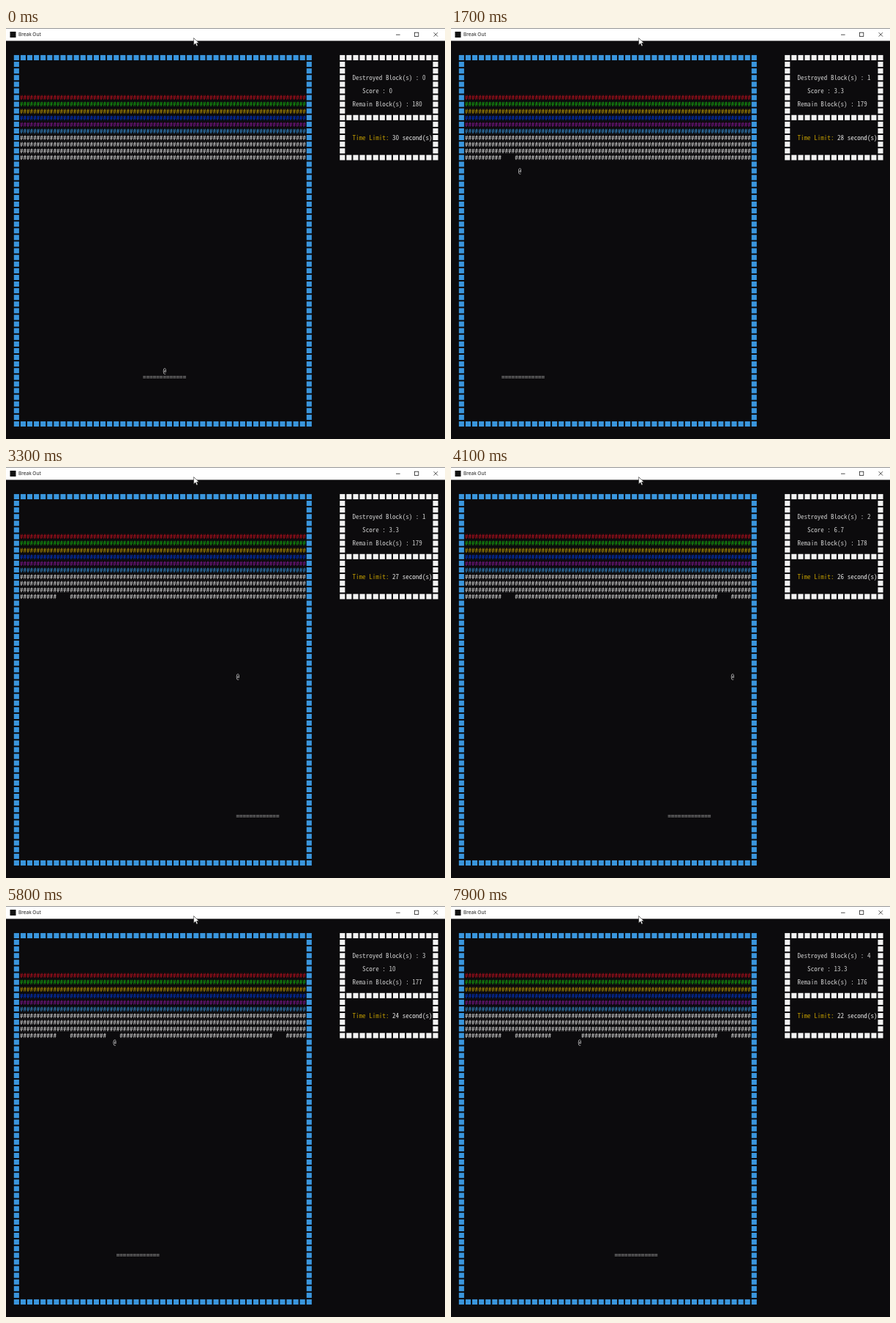
Recreate the animation shown at these times as an HTML page. Size 600x561 px, loop 8000 ms.

```html
<!DOCTYPE html>
<html lang="en">
<head>
<meta charset="utf-8">
<title>Break Out</title>
<style>
  html, body { margin: 0; width: 100%; height: 100%; overflow: hidden; background: #0c0b0d; }
  svg { display: block; width: 600px; height: 561px; }
  .cell { font: 9.09px "Noto Sans Mono CJK KR", "Noto Sans Mono CJK JP", "Liberation Mono", monospace; }
  .title { font: 6.6px "Open Sans", "Noto Sans", sans-serif; }
</style>
</head>
<body>
<svg id="stage" viewBox="0 0 600 561">
  <rect width="600" height="561" fill="#0c0b0d"/>
  <g id="walls"></g>
  <g id="console"></g>
  <rect width="600" height="17.5" fill="#fff"/>
  <rect width="600" height="0.7" fill="#666"/>
  <rect x="5.5" y="5" width="8" height="8" fill="#111"/>
  <text class="title" x="17" y="11.4" fill="#111">Break Out</text>
  <g fill="none" stroke="#222" stroke-width="0.8">
    <path d="M533 9.2h5.6M584.6 6.2l5.4 5.4M590 6.2l-5.4 5.4"/>
    <rect x="558.6" y="6.2" width="5.2" height="5.2"/>
  </g>
  <path d="M256.6 13.6v9.6l2.3-2.1 1.6 3.7 1.6-.7-1.6-3.5h3.1z" fill="#fff" stroke="#222" stroke-width="0.6"/>
</svg>
<script>
const NS = "http://www.w3.org/2000/svg";
const LOOP = 8000, FRAME = 100;
const CELL = 4.545, ROW = 9.09, LEFT = 18.95, TOP = 40.5;
const COLS = 86, PADDLE = 13, PADDLE_ROW = 48, LAST_BRICK_ROW = 15;
const LAUNCH = 574.2, STEP = 32.42, BOUNCE = 64;
const FIRST_TICK = 650;
const WHITE = "#e4e4e4", GREY = "#cccccc";

const walls = document.getElementById("walls");
const screen = document.getElementById("console");

function add(parent, tag, attrs) {
  const el = document.createElementNS(NS, tag);
  for (const key in attrs) el.setAttribute(key, attrs[key]);
  return parent.appendChild(el);
}

function label(fill) {
  return add(screen, "text", { class: "cell", fill });
}

// Puts one character in each console cell.
function print(el, col, row, str) {
  const xs = Array.from(str, (_, i) => (LEFT + (col + i) * CELL).toFixed(2));
  el.setAttribute("x", xs.join(" "));
  el.setAttribute("y", (TOP + row * ROW + 3.3).toFixed(2));
  const text = str.replace(/ /g, "\u00a0");
  if (el.textContent !== text) el.textContent = text;
}

function frame(col, width, height, fill, divider) {
  for (let r = 0; r < height; r++) {
    for (let c = 0; c < width; c++) {
      const edge = r % (height - 1) === 0 || c % (width - 1) === 0 || r === divider;
      if (edge) add(walls, "rect", {
        x: 10.8 + (col + c) * ROW, y: TOP - 3.55 + r * ROW, width: 7.1, height: 7.1, fill
      });
    }
  }
}

frame(0, 45, 56, "#3a96dd");
frame(49, 15, 16, "#f2f2f2", 9);

const brickColors = ["#c50f1f", "#16b010", "#c19c00", "#0037da", "#881798", "#3a96dd",
  WHITE, WHITE, WHITE, WHITE];
const bricks = brickColors.map((color, i) => {
  const el = label(color);
  print(el, 0, 6 + i, "#".repeat(COLS));
  return el;
});
const lastBricks = bricks[bricks.length - 1];

const destroyed = label(GREY), score = label(GREY), remain = label(GREY);
const limit = label("#c19c00"), seconds = label(WHITE);
const paddle = label(GREY), ball = label(WHITE);
print(limit, 100, 12, "Time Limit:");

// Ball columns per step: it pauses a step at a side wall and after the paddle.
const ballCols = [17];
for (let s = 1, x = 17, dir = -1; s < 240; s++) {
  if (s === 1 || s % BOUNCE !== 1) {
    const next = x + dir;
    if (next < 0 || next > 84) dir = -dir;
    else x = next;
  }
  ballCols.push(x);
}

const paddleKeys = [[0, 37], [120, 37], [540, 11], [1750, 11], [2450, 35], [2700, 35],
  [3200, 65], [3900, 65], [4300, 55], [5250, 55], [6400, -1], [6850, -1], [7650, 45], [LOOP, 45]];

function paddleCol(t) {
  const i = paddleKeys.findIndex(key => key[0] > t);
  const [t0, a] = paddleKeys[i - 1], [t1, b] = paddleKeys[i];
  const col = a + (b - a) * (t - t0) / (t1 - t0);
  return 2 * Math.round((col - 1) / 2) + 1;
}

function hitBlocks(step) {
  const hits = new Set();
  for (let s = BOUNCE / 2; s <= step; s += BOUNCE) hits.add(Math.floor(ballCols[s] / 5));
  return hits;
}

function draw(t) {
  const step = Math.floor((t - LAUNCH) / STEP);
  const left = paddleCol(t);
  const hits = hitBlocks(step);

  // A block's first cell stays covered while its left neighbour stands.
  const row = Array.from({ length: COLS }, (_, c) => {
    const block = Math.floor(c / 5);
    return hits.has(block) && (c % 5 || hits.has(block - 1)) ? " " : "#";
  });
  print(lastBricks, 0, LAST_BRICK_ROW, row.join(""));

  print(paddle, Math.max(left, 0), PADDLE_ROW, "=".repeat(PADDLE + Math.min(left, 0)));
  if (step < 0) print(ball, left + 6, PADDLE_ROW - 1, "@");
  else print(ball, ballCols[step], LAST_BRICK_ROW + Math.abs(32 - step % BOUNCE), "@");

  const n = hits.size;
  const time = 30 - Math.max(0, Math.floor((t - FIRST_TICK) / 1000) + 1);
  print(destroyed, 100, 3, `Destroyed Block(s) : ${n}`);
  print(score, 103, 5, `Score : ${+(n * 10 / 3).toFixed(1)}`);
  print(remain, 100, 7, `Remain Block(s) : ${180 - n}`);
  print(seconds, 112, 12, `${time} second(s)`);
}

let start, shown = -1;
function tick(now) {
  start ??= now;
  const t = Math.floor(((now - start) % LOOP) / FRAME) * FRAME;
  if (t !== shown) draw(shown = t);
  requestAnimationFrame(tick);
}
draw(0);
requestAnimationFrame(tick);
</script>
</body>
</html>
```
